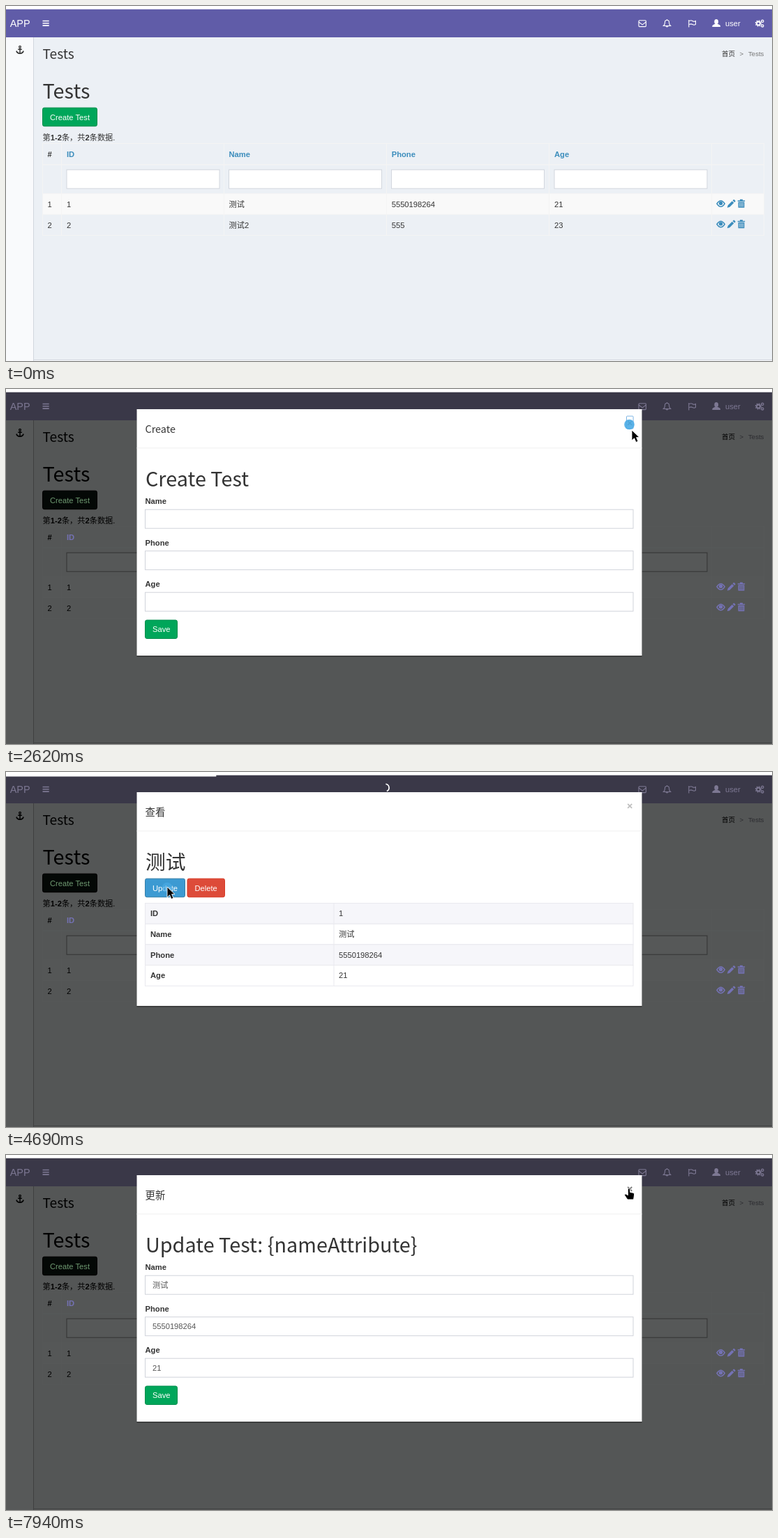
Animation of 1098x510 px, one loop 8000 ms. Source, as an HTML page:

```html
<!DOCTYPE html>
<html lang="zh">
<head>
<meta charset="utf-8">
<title>Tests</title>
<style>
html, body { margin: 0; height: 100%; overflow: hidden; background: #fff; }
svg {
  display: block; width: 100vw; height: 100vh;
  --bg: #ecf0f5; --nav: #605ca8; --nav-ink: #fff; --side: #f9fafc; --edge: #d2d6de;
  --ink: #333; --soft: #777; --link: #3c8dbc; --line: #f4f4f4; --stripe: #f9f9f9;
  --field: #fff; --field-edge: #d2d6de; --btn: #00a65a; --btn-edge: #008d4c; --btn-ink: #fff;
}
svg.focused { --btn-edge: #255625; }
svg.deep {
  --bg: #545656; --nav: #3a3848; --nav-ink: #7d7893; --side: #575959; --edge: #3f4040;
  --ink: #000; --soft: #2c2c30; --link: #7472b4; --line: #565858; --stripe: #555757;
  --field: #565858; --field-edge: #333; --btn: #040806; --btn-edge: #000; --btn-ink: #6f9a72;
}
text { font: 11.2px "Liberation Sans", "Noto Sans CJK SC", "Noto Sans CJK", sans-serif; fill: var(--ink); white-space: pre; }
.b { font-weight: 700; }
.h1, .h2, .h3 { font-family: "Noto Sans CJK SC", "Noto Sans CJK", sans-serif; font-weight: 500; }
.h1 { font-size: 28.8px; }
.h2 { font-size: 19.2px; }
.h3 { font-size: 14.4px; }
.logo { font-size: 14.4px; }
.small { font-size: 9.6px; }
.soft { fill: var(--soft); }
.link { fill: var(--link); }
.nav { fill: var(--nav-ink); }
.white { fill: #fff; }
.value { fill: #555; }
#modal { --ink: #333; }
.outline { fill: none; stroke: var(--nav-ink); stroke-width: 1.1; }
</style>
</head>
<body>
<svg id="stage" viewBox="0 0 1098 510" preserveAspectRatio="none">
  <g id="page"></g>
  <rect id="backdrop" y="4.5" width="1098" height="506"/>
  <rect id="shade" y="4.5" width="1098" height="506"/>
  <g id="modal"></g>
  <rect width="1098" height="4.5" fill="#fff"/>
  <g id="loader">
    <rect id="bar" y="4" height="2.5" fill="#fff"/>
    <path id="spinner" d="M-5.2-1.4A5.4 5.4 0 0 1 5.2-1.4" fill="none" stroke="#fff" stroke-width="1.7"/>
  </g>
  <circle id="ripple" r="7.3" fill="#4aabe6"/>
  <g id="cursor" stroke="#fff" stroke-width=".9">
    <path id="arrow" d="M0 0V15L3.6 11.8L6 17.5L9 16.2L6.6 10.6H11Z"/>
    <path id="hand" d="M-1.6 .8Q0-1.2 1.6 .8V5.5L6 6.3Q8 7 7.6 9L6.6 16H-2.2L-6.4 9.6Q-6 7.4-4 8.2L-1.6 9.8Z"/>
  </g>
</svg>
<script>
const $ = id => document.getElementById(id);
const PHONE = "5550198264", USER = "user";

// Markup helpers
const text = (x, y, s, cls = "") => `<text x="${x}" y="${y}" class="${cls}">${s}</text>`;
const rect = (x, y, w, h, fill, stroke = "none", r = 0) =>
  `<rect x="${x}" y="${y}" width="${w}" height="${h}" rx="${r}" fill="${fill}" stroke="${stroke}"/>`;
const line = (d, color, w = 1) => `<path d="${d}" fill="none" stroke="${color}" stroke-width="${w}"/>`;
const button = (x, y, w, label, fill, edge, cls = "white") =>
  rect(x, y, w, 26.5, fill, edge, 2.4) + text(x + 10.5, y + 17.3, label, cls);

const navIcons = () => `
  <path class="nav" d="M52.5 20.7h9.2v1.6h-9.2zm0 3.3h9.2v1.6h-9.2zm0 3.3h9.2v1.6h-9.2z"/>
  <g class="outline">
    <rect x="907" y="20.8" width="10.4" height="8.8" rx="1"/><path d="M907 23l5.2 3.9L917.400 23"/>
    <path d="M942.500 28.500h10q-2-1.500-2-5q0-3.200-3-3.200t-3 3.200q0 3.500-2 5zM946 29q1.500 2 3 0M947.500 20v-1"/>
    <path d="M978.800 20v10.500M979.500 21.500q2.500-1.500 4.600 0t4.400 0v5q-2.300 1.200-4.400 0t-4.600 0"/>
    <circle cx="1078.500" cy="25" r="2.5" stroke-width="1.8"/>
    <circle cx="1078.500" cy="25" r="4" stroke-width="1.4" stroke-dasharray="1.57"/>
    <circle cx="1084.300" cy="21.800" r="1.600" stroke-width="1.3"/>
    <circle cx="1084.300" cy="28.400" r="1.600" stroke-width="1.3"/>
  </g>
  <g class="nav"><ellipse cx="1018.200" cy="22.500" rx="2.900" ry="3.600"/>
    <path d="M1012.400 30v-1.200q0-1.400 4.300-3.200h3q4.300 1.800 4.300 3.200v1.200z"/></g>`;

const anchor = () => `<circle cx="20" cy="58.800" r="1.400" fill="none" stroke="var(--ink)" stroke-width="1.2"/>` +
  line("M20 60.2v8M17.200 62.200h5.600", "var(--ink)", 1.5) +
  line("M15 64.500q.6 3.300 5 3.700q4.400-.4 5-3.700", "var(--ink)", 1.6);

const rowIcons = y => `<g transform="translate(0 ${y})" class="link">
  <path d="M1019 0q5.600-8.400 11.200 0q-5.600 8.400-11.200 0z" fill="none" stroke="var(--link)" stroke-width="1.5"/>
  <circle cx="1024.600" cy="-.6" r="2.700"/>
  <path d="M1033.800 5.800l1-3.600l6-6l2.600 2.600l-6 6zM1041.600-4.500l1.200-1.200q.6-.4 1.200 0l1.400 1.400q.4.6 0 1.200l-1.200 1.200z"/>
  <path d="M1048.800-4.800h3.200v-1.500h4v1.500h3.200v1.600h-10.400zM1049.600-2.600h8.800v8.400h-8.800z"/>
  ${line("M1051.800-1.400v5.800M1054-1.400v5.800M1056.200-1.400v5.800", "var(--bg)", .8)}</g>`;

function drawPage() {
  const cols = [59.5, 87, 319.5, 552.7, 786];
  const cells = (y, values, cls) => values.map((v, i) => text(cols[i], y, v, cls(i))).join("");
  const plain = () => "";
  const edges = [52.5, 79.5, 312.5, 545.5, 778.5, 1011.5, 1086.5];
  return rect(0, 4.5, 1098, 506, "var(--bg)") +
    rect(0, 45, 39.5, 465, "var(--side)") + line("M39.500 45V510", "var(--edge)") +
    line("M40 508.500H1098", "var(--edge)") + rect(40, 509, 1058, 1, "var(--side)") +
    rect(0, 4.5, 1098, 40.5, "var(--nav)") +
    text(5.7, 29.8, "APP", "logo nav") + text(1031, 29, USER, "nav") + navIcons() + anchor() +
    text(52.5, 75.5, "Tests", "h2") + text(52.5, 133, "Tests", "h1") +
    text(1026, 72.3, "首页", "small") + text(1051.5, 72.3, "&gt;", "small soft") + text(1064, 72.3, "Tests", "small soft") +
    button(52.5, 146.2, 78, "Create Test", "var(--btn)", "var(--btn-edge)", "btn").replace('class="btn"', 'style="fill:var(--btn-ink)"') +
    text(52.5, 193, '第<tspan class="b">1-2</tspan>条，共<tspan class="b">2</tspan>条数据.') +
    rect(53, 270, 1033, 29, "var(--stripe)") +
    edges.map(x => line(`M${x} 197V329.500`, "var(--line)")).join("") +
    [197.5, 269.5, 299.5, 329.5].map(y => line(`M52 ${y}H1087`, "var(--line)")).join("") +
    line("M52 228H1087", "var(--line)", 1.6) +
    [87, 319.5, 552.5, 786].map(x => rect(x, 235.2, 219, 27, "var(--field)", "var(--field-edge)")).join("") +
    cells(216.5, ["#", "ID", "Name", "Phone", "Age"], i => i ? "b link" : "b") +
    cells(289, ["1", "1", "测试", PHONE, "21"], plain) +
    cells(318.5, ["2", "2", "测试2", "555", "23"], plain) +
    rowIcons(284) + rowIcons(313.5);
}

function frame(title, heading, height, body) {
  return rect(187.5, 31, 724, height, "#0004") + rect(187.5, 29, 724, height, "#fff") +
    line("M187.500 84.800H911.500", "#f0f0f0") +
    text(199.5, 62.5, title, "h3") + text(200, 140, heading, "h1") + body +
    line("M891.200 45.800l6 6m0-6l-6 6", "#000", 1.8).replace("<path", '<path class="close"') +
    rect(889.5, 39, 9.6, 18, "none", "#7db4e4", 1).replace("<rect", '<rect class="ring"');
}

function form(title, heading, values) {
  const rows = ["Name", "Phone", "Age"].map((label, i) => {
    const y = 173.2 + i * 59.5;
    return text(199.5, y - 8.2, label, "b") + rect(199.5, y, 699.5, 27, "#fff", "#d0d3da") +
      text(210, y + 17.6, values[i] || "", "value");
  }).join("");
  return frame(title, heading, 354, rows + button(199.5, 332, 46, "Save", "#00a65a", "#008d4c"));
}

function detail() {
  const rows = [["ID", "1"], ["Name", "测试"], ["Phone", PHONE], ["Age", "21"]].map(([k, v], i) => {
    const y = 188.5 + i * 29.7;
    return rect(199.5, y, 699.5, 29.7, i % 2 ? "#fff" : "#f6f6fa", "#e9e9ee") +
      text(207, y + 18.8, k, "b") + text(477, y + 18.8, v);
  }).join("");
  return frame("查看", "测试", 307,
    button(199.5, 153.2, 57, "Update", "#3c9ad2", "#367fa9") +
    button(260, 153.2, 53.5, "Delete", "#dd4b39", "#d73925") +
    rows + line("M470 188V307", "#e9e9ee"));
}

const update = form("更新", "Update Test: {nameAttribute}", ["测试", PHONE, "21"]);
const fillMark = rect(874.5, 182, 8, 9.5, "none", "#666") +
  rect(877.2, 183.8, 2.6, 2.6, "#666") + rect(876.4, 187.4, 4.2, 1.6, "#666");
const views = {
  create: { html: form("Create", "Create Test", []), rise: 88.5 },
  detail: { html: detail(), rise: 77 },
  update: { html: update, rise: 88.5 },
  marked: { html: update + fillMark, rise: 88.5 }
};

// Timeline
const dialogs = [
  { open: 1110, close: 2625, view: () => "create" },
  { open: 3470, close: 5953, view: t => t < 4850 ? "detail" : t < 5100 ? "update" : "marked" },
  { open: 6870, close: 1e6, view: () => "update" }
];
const loads = [1110, 3470, 4550, 6870];
const clicks = [[1090, 105, 164], [2570, 893.5, 51], [3450, 1027, 282], [4540, 231, 166], [5910, 892, 49], [6860, 1039, 281]];
const path = [
  [730, 260, 420], [1040, 105, 163], [1300, 105, 163], [2200, 890, 54], [2360, 893, 49], [2570, 893, 51],
  [2620, 897, 59], [3120, 1026, 274], [3260, 1027, 281], [3750, 1027, 281], [4270, 238, 140], [4400, 231, 165],
  [4750, 231, 165], [5350, 908, 48], [5560, 893, 49], [5910, 892, 49], [6010, 921, 88], [6630, 1038, 282],
  [7100, 1038, 282], [7660, 895, 75], [7940, 893, 48], [8000, 893, 48]
];
const handTimes = [[2200, 2600], [4270, 4570], [5400, 5940], [7800, 8000]];

const clamp = x => Math.max(0, Math.min(1, x));
// cubic-bezier(0, 0, .58, 1)
function easeOut(x) {
  let lo = 0, hi = 1, s = .5;
  for (let i = 0; i < 20; i++) {
    s = (lo + hi) / 2;
    if (1.74 * (1 - s) * s * s + s ** 3 < x) lo = s; else hi = s;
  }
  return s * s * (3 - 2 * s);
}
const set = (id, name, value) => $(id).setAttribute(name, value);

let shown = "";
function drawDialog(t) {
  const d = dialogs.find(d => t >= d.open && t < d.close + 450);
  let dim = 0, alpha = 0, slide = 1;
  if (d) {
    const closing = t >= d.close, show = d.open + 150;
    dim = closing ? 1 - clamp((t - d.close - 300) / 150) : clamp((t - d.open) / 150);
    alpha = closing ? 1 - clamp((t - d.close - 40) / 150) : clamp((t - show) / 150);
    slide = closing ? easeOut(clamp((t - d.close) / 300)) : 1 - easeOut(clamp((t - show) / 300));
    const name = d.view(t);
    if (name !== shown) $("modal").innerHTML = views[shown = name].html;
    const ring = t > d.close - 60;
    document.querySelector(".ring").style.opacity = ring ? 1 : 0;
    document.querySelector(".close").style.opacity = ring || t > 7850 ? .55 : .25;
    set("modal", "transform", `translate(0 ${-views[name].rise * slide})`);
  }
  const deep = alpha > .8;
  $("stage").classList.toggle("deep", deep);
  $("stage").classList.toggle("focused", t > 1100);
  set("modal", "opacity", alpha);
  set("backdrop", "opacity", deep ? 0 : dim * .5);
  set("shade", "opacity", deep ? 0 : alpha * .3);
}

function drawLoader(t) {
  const age = t - (loads.findLast(s => t >= s) ?? -1e6);
  set("loader", "opacity", 1 - clamp((age - 500) / 200));
  set("bar", "width", 1098 * clamp((age - 23) / 430));
  set("spinner", "transform", `translate(543.700 22.600) rotate(${(age - 50) * .9})`);
}

function drawCursor(t) {
  const i = path.findLastIndex(p => t >= p[0]);
  set("cursor", "opacity", i < 0 ? 0 : 1);
  if (i >= 0) {
    const a = path[i], b = path[i + 1] || a;
    const k = clamp((t - a[0]) / (b[0] - a[0] || 1));
    const e = k * k * (3 - 2 * k);
    set("cursor", "transform", `translate(${a[1] + (b[1] - a[1]) * e} ${a[2] + (b[2] - a[2]) * e})`);
  }
  const hand = handTimes.some(([from, to]) => t >= from && t < to);
  set("hand", "opacity", hand ? 1 : 0);
  set("arrow", "opacity", hand ? 0 : 1);
  const [at, x, y] = clicks.findLast(c => t >= c[0]) || [-1e6, 0, 0];
  set("ripple", "transform", `translate(${x} ${y})`);
  set("ripple", "opacity", .9 * (1 - clamp((t - at - 100) / 170)));
}

$("page").innerHTML = drawPage();
const start = performance.now();
function tick(now) {
  const t = Math.max(0, now - start) % 8000;
  drawDialog(t);
  drawLoader(t);
  drawCursor(t);
  requestAnimationFrame(tick);
}
tick(start);
</script>
</body>
</html>
```
